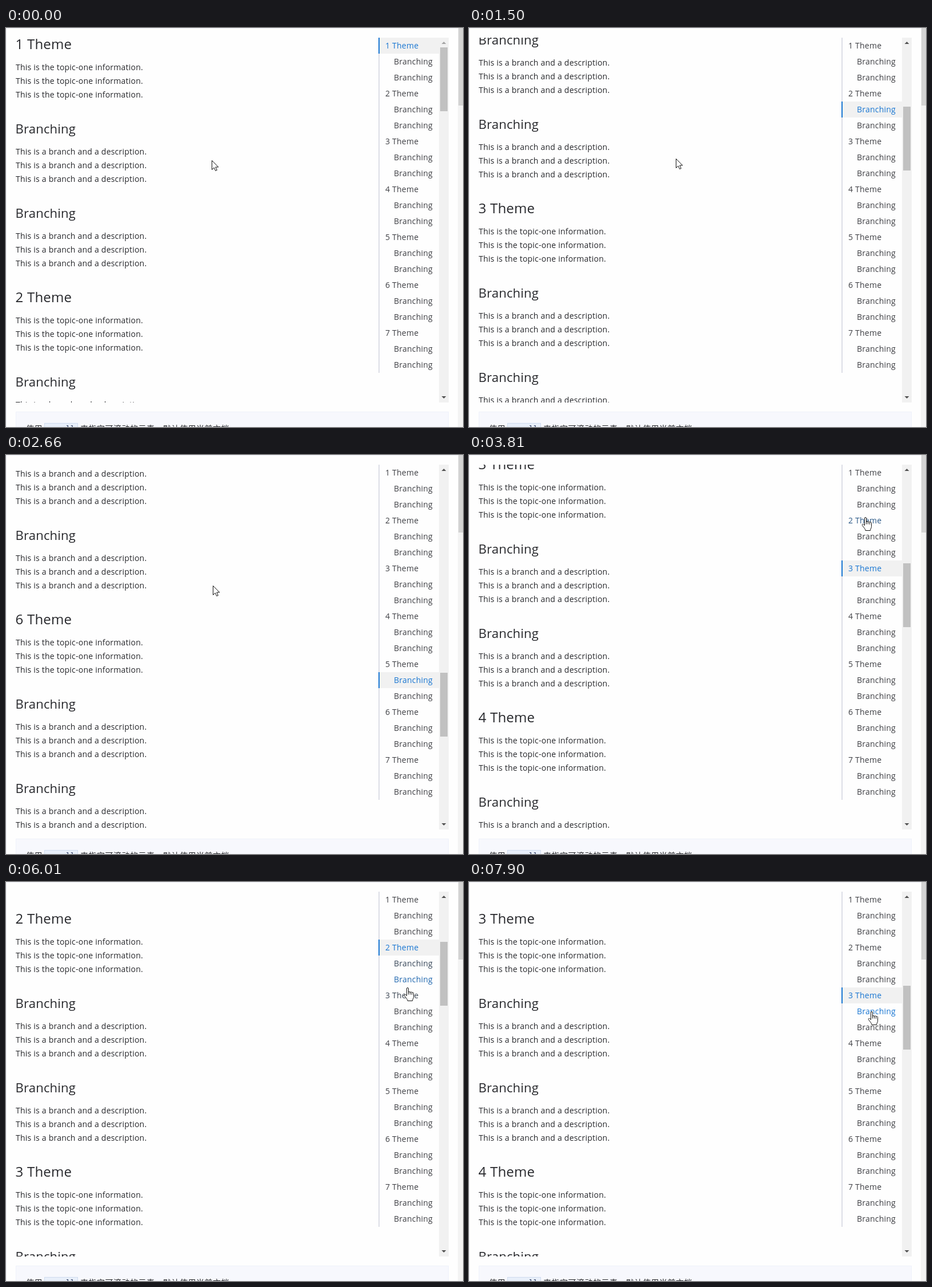
Animation of 800 by 700 pixels, one loop 8 s. Source, as an HTML page with a canvas:

```html
<!DOCTYPE html>
<html lang="en">
<head>
<meta charset="utf-8">
<title>Scroll spy</title>
<style>
  html, body { margin: 0; width: 100%; height: 100%; overflow: hidden; background: #fefefe; }
  canvas { display: block; }
</style>
</head>
<body>
<canvas id="stage" width="800" height="700"></canvas>
<script>
const ctx = document.getElementById('stage').getContext('2d');
const LOOP = 8000, REFRESH = 78;
const SANS = '"Open Sans", "Noto Sans", sans-serif';
const CJK = '"Noto Sans CJK SC", "Noto Sans CJK", sans-serif';
const MONO = '"DejaVu Sans Mono", monospace';
const BLUE = [25, 118, 210], INK = [62, 63, 68], DARK = '#27282c';
const TOP = 17, BOTTOM = 657, ROW = 28, THEMES = 7, ROWS = THEMES * 3;

const themeTop = i => 444 * i + (i > 3 ? 40 : 0);
const anchor = row => Math.max(0, themeTop(Math.floor(row / 3)) + 148 * (row % 3) - 36);
const clamp = v => Math.max(0, Math.min(1, v));
const smooth = p => p * p * (3 - 2 * p);
const cubic = p => p < 0.5 ? 4 * p ** 3 : 1 - 4 * (1 - p) ** 3;

const wheel = (start, end, to) => ({ start, end, to, ease: p => p });
const click = (start, row) => ({ start, end: start + 250, to: anchor(row), ease: cubic });
const glide = (end, x, y) => ({ start: end - 240, end, x, y });

const scrolls = [
  wheel(740, 1250, 600), wheel(1500, 2560, 2000), wheel(2850, 3450, 900),
  click(3910, 3), click(4587, 0), click(5400, 3), click(7520, 6)
];
const glides = [
  glide(170, 362, 229), glide(3740, 694, 109), glide(4580, 701, 35), glide(5250, 702, 113),
  glide(6006, 703, 185), glide(6900, 705, 249), glide(7430, 704, 196), glide(7760, 705, 227)
];

function scrollAt(t) {
  let y = 0;
  for (const { start, end, to, ease } of scrolls) {
    y += (to - y) * ease(clamp((t - start) / (end - start)));
  }
  return Math.round(y);
}

function pointerAt(t) {
  let x = 360, y = 233;
  for (const g of glides) {
    const p = smooth(clamp((t - g.start) / (g.end - g.start)));
    x += (g.x - x) * p;
    y += (g.y - y) * p;
  }
  return { x: Math.round(x), y: Math.round(y) };
}

function activeRow(t) {
  const y = scrollAt(t);
  let row = 0;
  while (row + 1 < ROWS && anchor(row + 1) <= y) row++;
  return row;
}

function hoverRow(t) {
  const { x, y } = pointerAt(t);
  return x > 652 && x < 758 ? Math.floor((y - TOP) / ROW) : -1;
}

// Mean over the recent past acts as a linear transition
function recent(t, span, value) {
  const n = 40;
  let sum = 0;
  for (let k = 0; k < n; k++) sum += value(t - span * (k + 0.5) / n);
  return sum / n;
}

function rect(x, y, w, h, color) {
  ctx.fillStyle = color;
  ctx.fillRect(x, y, w, h);
}

function text(str, x, y, size, color = DARK, spacing = 0.22, family = SANS) {
  ctx.font = `${size}px ${family}`;
  ctx.letterSpacing = spacing + 'px';
  ctx.fillStyle = color;
  ctx.fillText(str, x, y);
}

function section(title, size, line, top) {
  text(title, 16.5, top + 37, size);
  for (let k = 0; k < 3; k++) text(line, 17, top + 74 + 24 * k, 14);
}

function drawContent(y) {
  ctx.save();
  ctx.beginPath();
  ctx.rect(16, TOP, 636, BOTTOM - TOP);
  ctx.clip();
  for (let i = 0; i < THEMES; i++) {
    const top = themeTop(i) - y;
    section(`${i + 1} Theme`, 24, 'This is the topic-one information.', top);
    for (const branch of [148, 296]) {
      section('Branching', 22, 'This is a branch and a description.', top + branch);
    }
  }
  ctx.restore();
}

function drawNav(t) {
  const markY = Math.round(TOP + ROW * recent(t, 112, activeRow));
  rect(652, TOP, 2, ROW * ROWS, '#dcdee6');
  rect(654, markY, 104, ROW, '#f1f1f1');
  rect(652, markY, 2, ROW, '#1976d2');
  const active = activeRow(t - 112);
  for (let i = 0; i < ROWS; i++) {
    const tint = i === active ? 1 : recent(t, 120, u => +(hoverRow(u) === i));
    const color = `rgb(${INK.map((c, k) => Math.round(c + (BLUE[k] - c) * tint))})`;
    const y = TOP + ROW * i + 19;
    if (i % 3) text('Branching', 679, y, 14, color);
    else text(`${i / 3 + 1} Theme`, 664, y, 14, color);
  }
}

function triangle(y, dir, color) {
  ctx.fillStyle = color;
  ctx.beginPath();
  ctx.moveTo(762.5, y + 2 * dir);
  ctx.lineTo(770.5, y + 2 * dir);
  ctx.lineTo(766.5, y - 2 * dir);
  ctx.fill();
}

function drawScrollbars(y) {
  rect(758, TOP, 17, BOTTOM - TOP, '#f1f1f1');
  rect(760, Math.round(34 + y * 0.1738), 13, 112, '#c1c1c1');
  triangle(26, 1, y ? '#505050' : '#a3a3a3');
  triangle(648, -1, '#505050');
  rect(791, 0, 9, 700, '#f3f3f3');
  rect(792, 0, 8, 136, '#d3d3d3');
}

function drawNote() {
  rect(17, 673, 758, 30, '#eff2fa');
  rect(18, 674, 756, 30, '#f7f8fd');
  rect(67, 693, 59, 10, '#cfdcef');
  rect(68, 694, 57, 10, '#e8effa');
  text('使用', 35, 708, 14, DARK, 0.5, CJK);
  text('scroll', 75, 707, 12.5, '#27345c', 0, MONO);
  text('来指定可滚动的元素，默认使用当前文档。', 130, 708, 14, DARK, 0.5, CJK);
}

const ARROW = new Path2D('M.5 .5V16.5L4.2 13L6.8 18.5L9.3 17.3L6.8 12H11.8Z');
const HAND = new Path2D('M-1.5 14V1.5a1.5 1.5 0 0 1 3 0V8.5a1.5 1.5 0 0 1 3 0a1.5 1.5 0 0 1 3 .8' +
  'a1.5 1.5 0 0 1 3 1V16c0 3-2 4-2 7H0c0-3-3-5-5.5-9c-1-2 1-3 2.5-1.5z');
const KNUCKLES = new Path2D('M1.5 8v4M4.5 8.5v3.5M7.5 9.3v3');

function drawPointer(t) {
  const { x, y } = pointerAt(t);
  const overLink = hoverRow(t) >= 0;
  const shape = overLink ? HAND : ARROW;
  ctx.save();
  ctx.translate(x, y + (overLink ? 0.5 : 0));
  ctx.fillStyle = '#fff';
  ctx.strokeStyle = '#111';
  ctx.fill(shape);
  ctx.stroke(shape);
  if (overLink) ctx.stroke(KNUCKLES);
  ctx.restore();
}

function draw(now) {
  // The screen only refreshes at a fixed pace
  const t = Math.floor((now % LOOP) / REFRESH) * REFRESH;
  const y = scrollAt(t);
  rect(0, 0, 800, 700, '#fefefe');
  rect(0, 0, 791, 1, '#f0f1f9');
  rect(0, 0, 1, 700, '#f0f1f9');
  drawContent(y);
  drawNav(t);
  drawScrollbars(y);
  drawNote();
  drawPointer(t);
}

let begin = null;
function tick() {
  const now = performance.now();
  if (begin === null) begin = now;
  draw(now - begin);
  requestAnimationFrame(tick);
}
tick();
</script>
</body>
</html>
```
